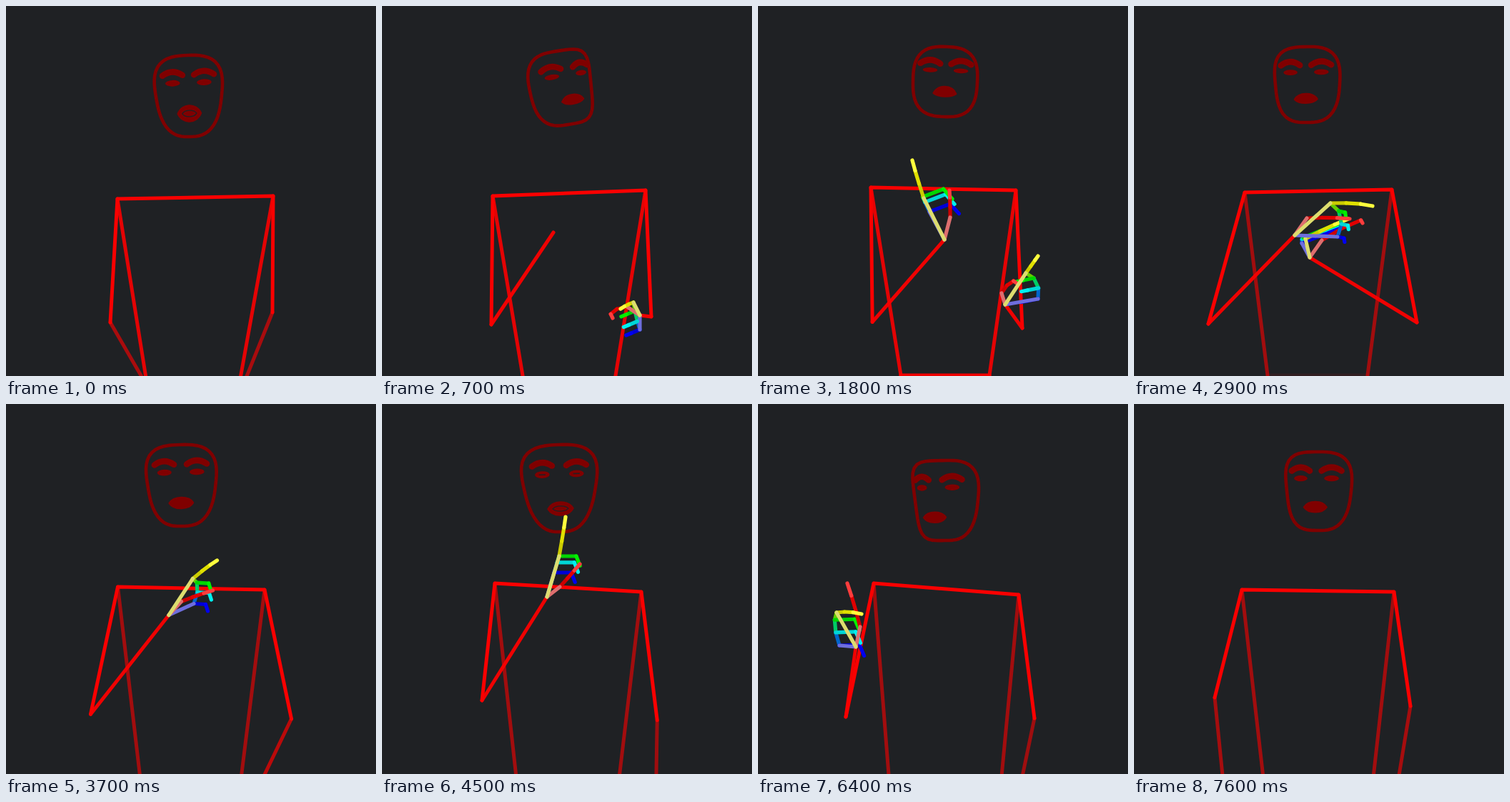
An HTML page that plays this animation: 518x518 px, repeating every 7.7 s.

```html
<!DOCTYPE html>
<html lang="en">
<head>
<meta charset="utf-8">
<title>Signing skeleton</title>
<style>
html, body { margin: 0; width: 100%; height: 100%; overflow: hidden; background: #1f2124; }
svg { display: block; width: 100%; height: 100%; fill: none; stroke-linecap: round; stroke-linejoin: round; }
</style>
</head>
<body>
<svg id="stage" viewBox="0 0 518 518"></svg>
<script>
const LOOP = 7700, STEP = 100;
const BACK = '#1f2124', FACE = '#800000', BODY = '#fa0000';

// Key poses: a time, then the values that are eased between.
// Head: centre, half width, half height, sideways turn, roll in degrees, mouth opening.
const head = [
  [0, 256, 126, 46, 57, 0, -2, 11], [700, 250, 115, 43, 52, 11, -9, 6],
  [1800, 262, 106, 45, 49, 0, 2, 6], [2900, 243, 110, 45, 53, -2, -1, 6],
  [4500, 249, 118, 50, 61, 0, -2, 9], [6400, 264, 135, 44, 56, -13, -1, 7],
  [7600, 259, 122, 45, 55, -4, 0, 7]
];
const shoulders = [
  [0, 156, 270, 374, 266], [700, 155, 266, 369, 258], [1800, 158, 254, 361, 258],
  [2900, 155, 261, 361, 257], [4500, 158, 251, 363, 263], [6400, 162, 251, 365, 267],
  [7600, 151, 260, 364, 263]
];
// Hips: centre, half width, height.
const hips = [
  [0, 262, 65, 527], [1800, 262, 62, 517], [2900, 257, 70, 517],
  [4500, 260, 71, 532], [6400, 262, 78, 532], [7600, 258, 76, 532]
];
const arms = {
  left: {
    elbow: [[0, 146, 443], [700, 153, 446], [2400, 163, 441], [2900, 104, 445],
      [3300, 111, 441], [4500, 140, 415], [6400, 123, 438], [7600, 113, 411]],
    wrist: [[0, 205, 545], [700, 240, 317], [1800, 261, 327], [2900, 225, 321],
      [4500, 231, 270], [5000, 233, 268], [6000, 126, 325], [6400, 137, 340],
      [7100, 125, 545], [7600, 127, 550]]
  },
  right: {
    elbow: [[0, 373, 429], [700, 377, 435], [1800, 370, 451], [2900, 396, 443],
      [3200, 431, 436], [4000, 385, 443], [6400, 387, 440], [7600, 387, 423]],
    wrist: [[0, 325, 548], [700, 361, 433], [1800, 346, 418], [2900, 246, 352],
      [4000, 386, 560], [6400, 362, 560], [7600, 366, 550]]
  }
};
// Hands, from the wrist: thumb joint and tip, index knuckle and tip, little knuckle, curl.
const hands = {
  left: {
    from: 800, to: 6700, wrap: 1.2, thumbBow: .05,
    poses: [
      [1800, 8, -31, 7, -69, -29, -58, -45, -111, -21, -39, 29, -11],
      [2900, 17, -24, 77, -23, 50, -45, 109, -41, 60, 2, 9, 2],
      [4500, 18, -14, 46, -46, 17, -57, 26, -112, 10, -34, 24, 0],
      [6400, 6, -28, -12, -89, -27, -48, 8, -46, -23, -2, 28, -1]
    ]
  },
  right: {
    from: 500, to: 3500, wrap: 0, thumbBow: .35,
    poses: [
      [700, -18, -12, -38, 4, -9, -18, -27, -9, 0, 20, -12, 5],
      [1800, -5, -16, 16, -30, 29, -44, 46, -68, 46, -8, -15, 3],
      [2900, 17, -24, 74, -48, -6, -26, 54, -54, -11, -20, 33, -13]
    ]
  }
};

const clamp = (v, low, high) => Math.min(high, Math.max(low, v));
const mix = (a, b, k) => a.map((v, i) => v + (b[i] - v) * k);
const plus = (a, b) => a.map((v, i) => v + b[i]);
const scale = (a, k) => a.map(v => v * k);
const poly = (...list) => 'M' + list.map(p => p.join()).join('L');

function ease(t, from, to) {
  const k = clamp((t - from) / (to - from), 0, 1);
  return k * k * (3 - 2 * k);
}

function sample(track, t) {
  const next = track.findIndex(key => key[0] > t);
  if (next === 0) return track[0].slice(1);
  if (next < 0) return track[track.length - 1].slice(1);
  const a = track[next - 1], b = track[next];
  return mix(a, b, ease(t, a[0], b[0])).slice(1);
}

function pairs(values) {
  return Array.from({ length: values.length / 2 }, (_, i) => values.slice(i * 2, i * 2 + 2));
}

// Evenly spaced joints from a to b, pushed away from the wrist in the middle.
function bowed(a, b, bow, count = 4) {
  return Array.from({ length: count }, (_, i) => {
    const k = i / (count - 1);
    return scale(mix(a, b, k), 1 + bow * Math.sin(Math.PI * k));
  });
}

const stage = document.getElementById('stage');

function set(node, attributes) {
  for (const name in attributes) node.setAttribute(name, attributes[name]);
}

function add(tag, attributes = {}, parent = stage) {
  const node = document.createElementNS('http://www.w3.org/2000/svg', tag);
  set(node, attributes);
  return parent.appendChild(node);
}

const faceGroup = add('g', { stroke: FACE, 'stroke-width': 4.6 });
const outline = add('path', {}, faceGroup);
const sides = [-1, 1].map(side => ({
  side,
  brow: add('path', { 'stroke-width': 8.5 }, faceGroup),
  eye: add('ellipse', { fill: FACE, stroke: 'none' }, faceGroup),
  slit: add('path', { stroke: BACK }, faceGroup)
}));
const lips = add('path', { fill: FACE, 'stroke-width': 2.5 }, faceGroup);
const lipGap = add('path', { stroke: BACK }, faceGroup);

const bodyGroup = add('g', { stroke: BODY, 'stroke-width': 5 });
const [hipLine, sideL, sideR, foreL, foreR, upper] =
  Array.from({ length: 6 }, () => add('path', {}, bodyGroup));

// A boxy oval; a taller face tapers more and the side turned away is flatter.
function faceOutline(w, h, turn) {
  const taper = (h - 48) * .018, count = 60;
  const spot = i => {
    const a = i / count * 2 * Math.PI, c = Math.cos(a), s = Math.sin(a);
    const power = 2.8 + Math.max(0, Math.sign(c) * turn) * .16;
    const reach = (Math.abs(c) ** power + Math.abs(s) ** power) ** (-1 / power);
    const y = s * reach;
    return [w * c * reach * (1 - taper * y), h * y];
  };
  return poly(...Array.from({ length: count }, (_, i) => spot(i))) + 'Z';
}

function lens(x, y, rx, up, down) {
  const c = rx * .62, u = -up * 1.33, d = down * 1.33;
  return `M${x - rx} ${y}c${rx - c} ${u} ${rx + c} ${u} ${2 * rx} 0` +
    `c${c - rx} ${d} ${-c - rx} ${d} ${-2 * rx} 0Z`;
}

function drawFace(t) {
  const [x, y, w, h, turn, roll, open] = sample(head, t);
  set(faceGroup, { transform: `translate(${x} ${y}) rotate(${roll})` });
  set(outline, { d: faceOutline(w, h, turn) });
  for (const { side, brow, eye, slit } of sides) {
    const cx = turn + side * w * .48, browY = -.57 * h, cy = -.325 * h;
    const half = 14 - Math.max(0, side * turn) * .35;
    set(brow, { d: `M${cx - half} ${browY + 3}Q${cx} ${browY - 7} ${cx + half} ${browY + 3}` });
    set(eye, { cx, cy, rx: half * .74, ry: 3.3 + (h - 48) * .12 });
    set(slit, { d: `M${cx - 4} ${cy}h8`, 'stroke-width': clamp((h - 58) * .5, 0, 1.5) });
  }
  const mouthX = turn * 1.3, mouthY = h - 32.5, lift = Math.max(0, 56 - h) * .5;
  set(lips, { d: lens(mouthX, mouthY, w * .35, open + lift, open - lift * .6) });
  set(lipGap, {
    d: lens(mouthX, mouthY, w * .22, open * .4, open * .4),
    'stroke-width': clamp(open - 7.5, 0, 1.3)
  });
}

function makeHand(spec) {
  const group = add('g', { 'stroke-width': 5.2 });
  const stroke = (hue, sat, light) =>
    add('path', { stroke: `hsl(${hue},${sat}%,${light}%)` }, group);
  const palm = [90, 150, 210].map(hue => stroke(hue, 100, 40));
  const fingers = [240, 180, 120, 0, 60].map(hue => ({
    hue,
    bones: (hue < 100 ? [40, 44, 62] : [42, 47]).map(light => stroke(hue, 100, light)),
    root: [120, 180].includes(hue) ? null : stroke(hue, 62, 65)
  }));
  return { ...spec, group, palm, fingers };
}

function drawHand(hand, wrist, t) {
  const visible = t >= hand.from && t <= hand.to;
  set(hand.group, { display: visible ? 'inline' : 'none', transform: `translate(${wrist})` });
  if (!visible) return;
  const [thumb, thumbTip, index, indexTip, little, curl] = pairs(sample(hand.poses, t));
  const knuckles = bowed(index, little, .18);
  const c = Math.cos(hand.wrap) * .6, s = Math.sin(hand.wrap) * .6;
  const wrapped = [curl[0] * c - curl[1] * s, curl[0] * s + curl[1] * c];
  const joints = hue => {
    if (hue === 0) return bowed(thumb, thumbTip, hand.thumbBow);
    if (hue === 60) return bowed(index, indexTip, .04);
    const knuckle = knuckles[hue / 60 - 1], bend = plus(knuckle, curl);
    return [knuckle, bend, plus(bend, wrapped)];
  };
  hand.palm.forEach((path, i) => set(path, { d: poly(knuckles[i], knuckles[i + 1]) }));
  for (const { hue, root, bones } of hand.fingers) {
    const chain = joints(hue);
    if (root) set(root, { d: poly([0, 0], chain[0]) });
    bones.forEach((path, i) => set(path, { d: poly(chain[i], chain[i + 1]) }));
  }
}

const rightHand = makeHand(hands.right), leftHand = makeHand(hands.left);

function draw(t) {
  drawFace(t);
  const [shoulderL, shoulderR] = pairs(sample(shoulders, t));
  const [middle, half, hipY] = sample(hips, t);
  const hipL = [middle - half, hipY], hipR = [middle + half, hipY];
  const elbowL = sample(arms.left.elbow, t), wristL = sample(arms.left.wrist, t);
  const elbowR = sample(arms.right.elbow, t), wristR = sample(arms.right.wrist, t);
  const fading = ease(t, 1800, 2900);
  const side = .9 - .3 * fading;
  // Limbs grow dim as they leave the stage.
  const armOpacity = wrist => clamp(.95 - (wrist[1] - 450) / 300, .5, .95);

  set(hipLine, { d: poly(hipL, hipR), opacity: .95 - .87 * fading });
  set(sideL, { d: poly(shoulderL, hipL), opacity: side });
  set(sideR, { d: poly(shoulderR, hipR), opacity: side });
  set(foreL, { d: poly(elbowL, wristL), opacity: armOpacity(wristL) });
  set(foreR, { d: poly(elbowR, wristR), opacity: armOpacity(wristR) });
  set(upper, { d: poly(elbowL, shoulderL, shoulderR, elbowR) });
  drawHand(rightHand, wristR, t);
  drawHand(leftHand, wristL, t);
}

const begin = performance.now();
function tick() {
  const elapsed = Math.max(0, performance.now() - begin) % LOOP;
  draw(Math.floor(elapsed / STEP) * STEP);
  requestAnimationFrame(tick);
}
tick();
</script>
</body>
</html>
```
